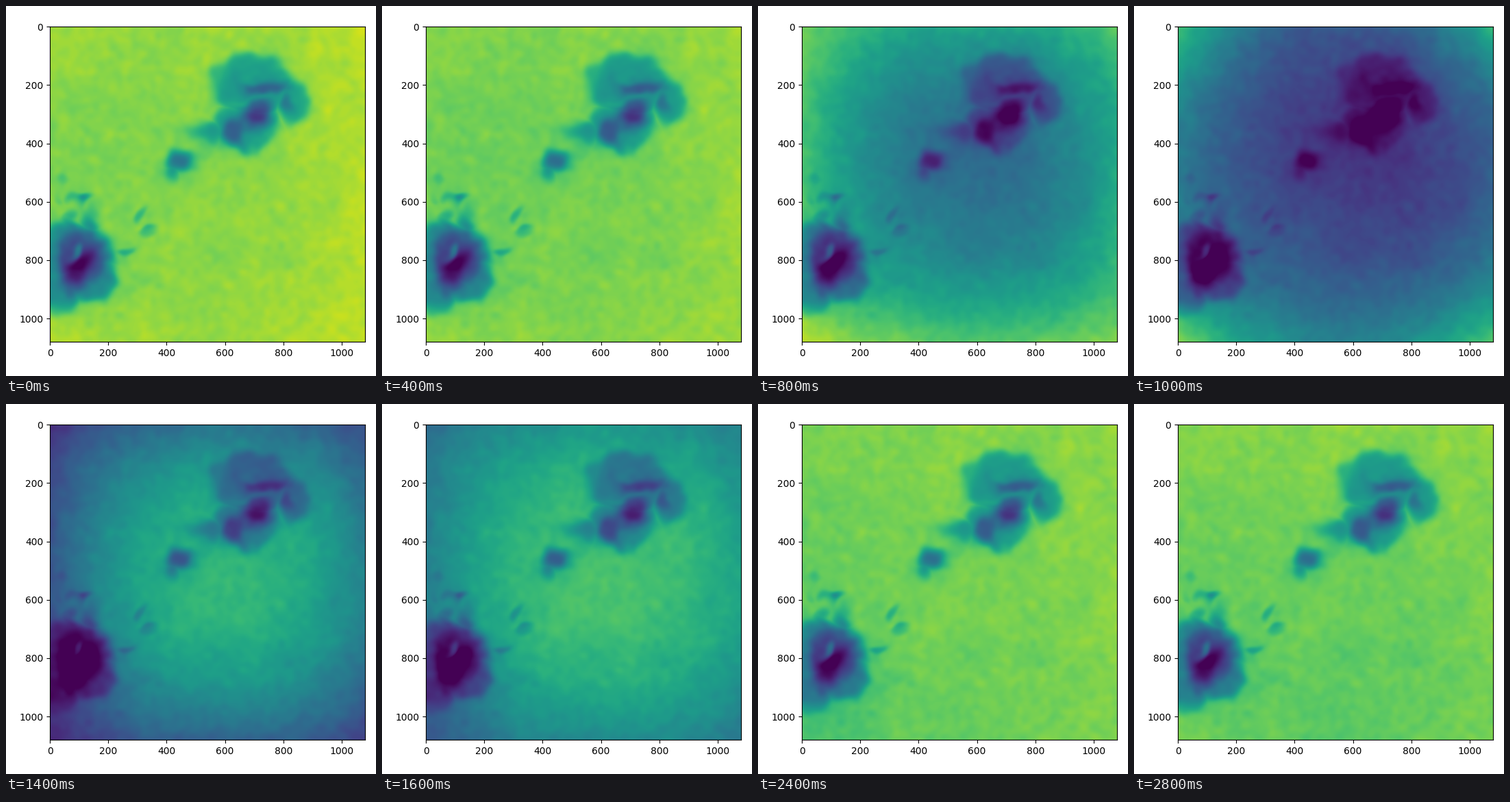
These frames come from a looping animation (540 by 540 pixels, 3 s). A matplotlib script:

```python
import numpy as np
import matplotlib.pyplot as plt
from matplotlib.animation import FuncAnimation

SIZE, N, FRAMES, STEP = 540, 270, 15, 200
SPAN = 1080
rng = np.random.default_rng(7)
axis = (np.arange(N) + 0.5) * SPAN / N
U, V = np.meshgrid(2 * axis / SPAN - 1, 2 * axis / SPAN - 1)

# Key moments of the light: centre, edge and corner level, tilt right, tilt down
LIGHT = {
    0: (.82, .845, .89, .04, 0),
    2: (.788, .815, .84, .03, 0),
    4: (.37, .66, .81, -.06, .08),
    5: (.18, .36, .73, -.06, .09),
    7: (.66, .345, .16, .08, -.03),
    10: (.81, .80, .80, .04, -.01),
    14: (.775, .785, .81, .015, -.04),
}
times, levels = list(LIGHT), np.array(list(LIGHT.values()))


def grain(count, sigma):
    """Smooth seeded noise of unit strength."""
    nodes = np.linspace(-20, SPAN + 20, count)
    k = np.exp(-((axis[:, None] - nodes) / sigma) ** 2 / 2)
    k /= k.sum(axis=1, keepdims=True)
    g = k @ rng.standard_normal((count, count)) @ k.T
    return g / g.std()


# Slightly warped coordinates give every shape a ragged edge
X = axis[None, :] + 5 * grain(50, 16)
Y = axis[:, None] + 5 * grain(50, 16)


def radius(x, y, rx, ry, tilt=0):
    a = np.radians(tilt)
    dx, dy = X - x, Y - y
    along = (dx * np.cos(a) + dy * np.sin(a)) / rx
    across = (dy * np.cos(a) - dx * np.sin(a)) / ry
    return np.hypot(along, across)


def cloud(depth, soft, *ellipses):
    """Union of soft-edged ellipses."""
    mask = 0
    for x, y, rx, ry in ellipses:
        edge = (1 - radius(x, y, rx, ry)) * min(rx, ry) / soft
        mask = np.maximum(mask, 1 / (1 + np.exp(-edge)))
    return -depth * mask


def spot(level, x, y, rx, ry, tilt=0):
    return level * np.exp(-radius(x, y, rx, ry, tilt) ** 2.6)


def stains():
    # upper right
    s = cloud(.28, 9, (690, 200, 135, 110), (670, 345, 105, 82),
              (565, 360, 75, 28), (825, 255, 58, 75))
    s += spot(-.24, 728, 214, 78, 27)
    s += spot(-.40, 705, 303, 52, 42, -30)
    s += spot(-.21, 632, 360, 29, 50)
    s += spot(-.15, 810, 273, 27, 28)
    s += spot(.06, 690, 256, 75, 11, -10)
    # centre
    s += cloud(.26, 9, (447, 468, 44, 42), (418, 500, 25, 25))
    s += spot(-.17, 446, 465, 32, 26, -35)
    s += spot(-.06, 525, 430, 65, 35, -35)
    # lower left
    s += cloud(.34, 10, (70, 790, 150, 112), (130, 860, 98, 88),
               (30, 890, 100, 82), (140, 680, 22, 38))
    s += cloud(.25, 9, (110, 790, 85, 82), (85, 850, 42, 55))
    s += spot(-.25, 106, 815, 68, 36, -43)
    s += spot(.22, 90, 770, 15, 32, 25)
    # loose flecks
    for x, y, tilt in ((310, 638, -65), (335, 700, -20),
                       (268, 765, -20), (117, 582, 0)):
        s += spot(-.17, x, y, 27, 15, tilt)
    for x, y in rng.normal((80, 565), (35, 55), (9, 2)):
        s += spot(-.07, x, y, 18, 18)
    return s


def light(n):
    mid, edge, corner, right, down = (np.interp(n, times, c) for c in levels.T)
    u, v = np.abs(U) ** 2.2, np.abs(V) ** 2.2
    field = mid * (1 - u) * (1 - v) + corner * u * v
    field += edge * (u + v - 2 * u * v)
    field += right * U * (1 - v / 2) + down * V * (1 - u / 2)
    # a dark pool passes through the lower left corner
    pool = np.exp(-4 * ((U + 1) ** 2 + (V - 1) ** 2) - ((n - 10) / 2) ** 2)
    return np.clip(field - .22 * pool, 0, 1)


noise = .011 * grain(70, 11) + .007 * grain(30, 28)
relief = stains()


def picture(n):
    level = light(n)
    return level + noise + relief * np.sqrt(level / .82)


fig = plt.figure(figsize=(SIZE / 100, SIZE / 100), dpi=100)
ax = fig.add_axes([63.82 / SIZE, 50 / SIZE, 460 / SIZE, 460 / SIZE])
image = ax.imshow(picture(0), cmap="viridis", vmin=0, vmax=1,
                  interpolation="bilinear",
                  extent=(-0.5, SPAN - 0.5, SPAN - 0.5, -0.5))


def update(n):
    image.set_data(picture(n))
    return [image]


anim = FuncAnimation(fig, update, frames=FRAMES, interval=STEP,
                     repeat=True, repeat_delay=0)
plt.show()
```
